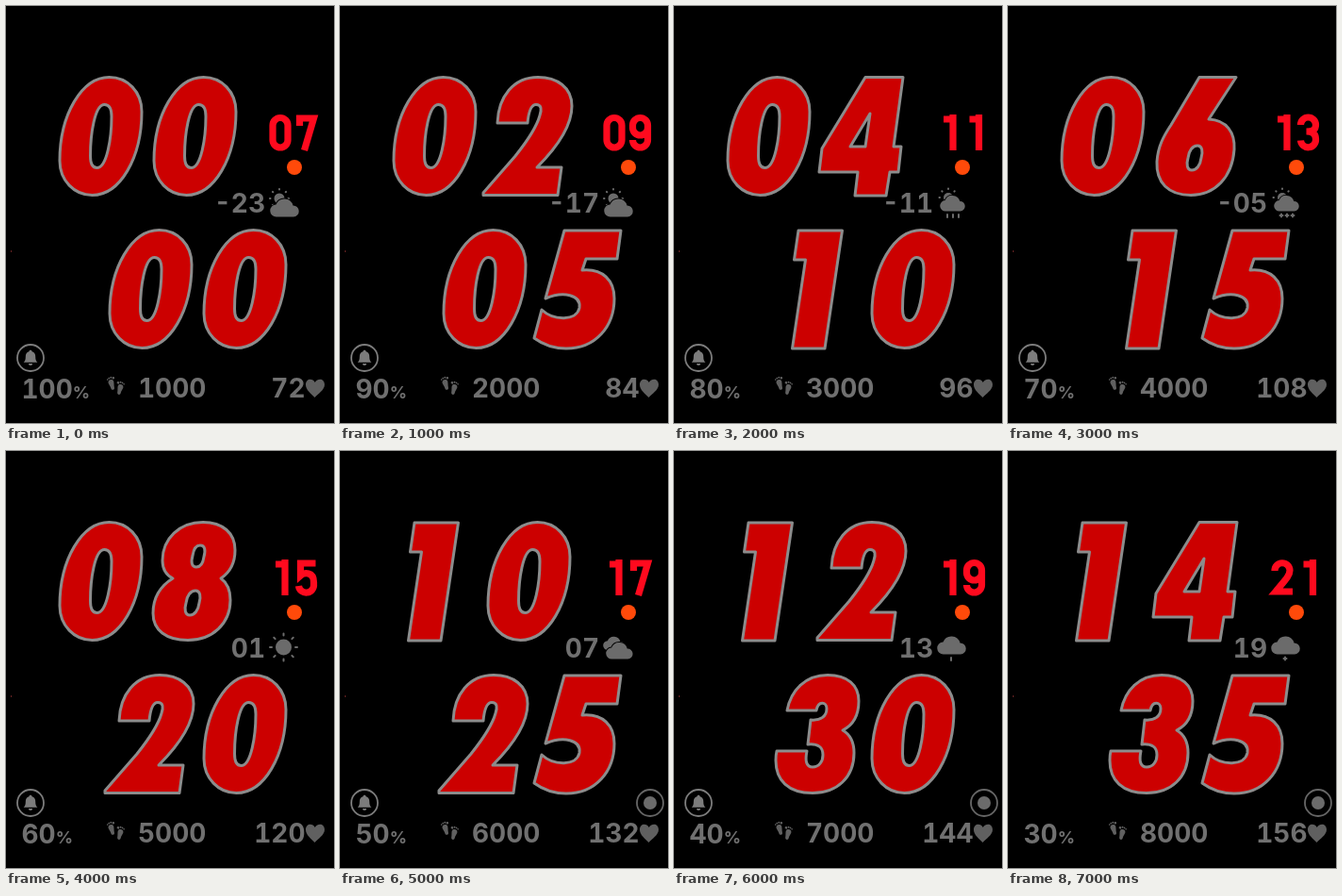
An HTML page that plays this animation: 348x442 px, repeating every 8 s.

```html
<!DOCTYPE html>
<html lang="en">
<head>
<meta charset="utf-8">
<title>Watch face</title>
<style>
  html, body { margin: 0; height: 100%; background: #000; overflow: hidden; }
  svg { display: block; }
  text { font: bold 28px Inter, Arial, sans-serif; font-variant-numeric: tabular-nums; fill: #707070; }
  .end { text-anchor: end; }
  .unit { font-size: 18px; }
  .big { fill: #c00; fill-rule: evenodd; stroke: #8c8c8c; stroke-width: 3; stroke-linejoin: round; }
  .day { fill: none; stroke: #ff0a1e; stroke-width: 7.2; }
  .ring { fill: none; stroke: #7c7c7c; stroke-width: 1.8; }
  .gray { fill: #6b6b6b; }
  .dim { fill: #606060; }
  .line { fill: none; stroke: #6b6b6b; stroke-width: 2; stroke-linecap: round; }
</style>
</head>
<body>
<svg width="348" height="442" viewBox="0 0 348 442">
  <rect width="348" height="442"/>
  <rect x="5" y="259" width="1" height="2" fill="#622"/>
  <g id="digits"></g>
  <circle cx="306" cy="171" r="8" fill="#ff4a0a"/>
  <g id="weather"></g>
  <text id="temp" class="end" x="275" y="218.5"></text>
  <text id="battery" x="16.5" y="416"></text>
  <text id="steps" x="140" y="415"></text>
  <text id="pulse" class="end" x="317.5" y="415"></text>

  <g id="bell">
    <circle class="ring" cx="26" cy="373" r="14"/>
    <path fill="#7c7c7c" transform="translate(3.400 48.500) scale(.87)" d="M26 363.500c1.200 0 1.800.8 1.800 1.800 3 1 4.200 3.300 4.200 6.200 0 4 .8 5 2.500 7H17.500c1.700-2 2.500-3 2.500-7 0-2.900 1.200-5.200 4.200-6.200 0-1 .6-1.800 1.800-1.800zM23.500 379.800h5a2.500 2.300 0 0 1-5 0z"/>
  </g>
  <g id="link">
    <circle class="ring" cx="329" cy="373" r="14" style="stroke:#666"/>
    <circle class="gray" cx="329" cy="373" r="7"/>
  </g>

  <defs>
    <g id="foot">
      <path d="M-3-2C-3-6 4-6 3.500-1C3 2 2 3 2 6C2 9-2 9-2 6C-2 3-3 1-3-2Z"/>
      <circle cx="-3.500" cy="-6" r="1.500"/><circle cx="-.8" cy="-7.300" r="1.100"/>
      <circle cx="1.500" cy="-7" r="1"/><circle cx="3.500" cy="-5.800" r=".9"/>
    </g>
  </defs>
  <g class="dim">
    <use href="#foot" transform="translate(112 400) rotate(-14) scale(-.9 .85)"/>
    <use href="#foot" transform="translate(121 405) rotate(12) scale(.9 .85)"/>
    <path d="M327.500 415C324 411 318 407 318 401.500C318 395 325 394 327.800 399C331 394 338 395 338 401.500C338 407 331 411 327.500 415Z"/>
  </g>
</svg>
<script>
const bigDigits = {
  0: "M53.500 1.500C73 1.500 88 17 88 38C88 87 65 126.500 35.500 126.500C16.500 126.500 1 111 1 90C1 41 24.500 1.500 53.500 1.500ZM48.500 30.500C53.500 30.500 56 35 56 43C56 66 51 97.500 40.500 97.500C35.500 97.500 33.500 93 33.500 85C33.500 62 38 30.500 48.500 30.500Z",
  1: "M23 2H69.500L51 127H16.500L30.500 33H18.500Z",
  2: "M-4 126.500H75L79 97H53C70 80 90 55 90 32C90 12 74 1.500 54 1.500C28 1.500 12 22 11 50H43C44 39 47 30.500 52 30.500C58 30.500 58 36 56 42C53 53 42 70 30 85L-4 124Z",
  3: "M11 39C15 18 30 1.500 54 1.500C75 1.500 87 12 87 29C87 45 80 55 70 60C77 64 82 72 82 84C82 110 64 126.500 38 126.500C12 126.500-1 113-1 92Q-1 86 0 82H32C30 92 31 99 38 99C45 99 49 93 49 86C49 78 44 74 33 75L36 49C47 50 53 45 53 37C53 30 44 28 42 39Z",
  4: "M47 1.500H87L77 75H85L82 102H73L69 127H36L39 102H-2L1 77ZM52 40L31 75H47Z",
  5: "M29 2H89L85 32H52L48 44C70 42 82 55 82 74C82 104 62 127 31 127Q12 127-3 116L5 86C18 98 42 98 45 84C47 70 28 66 9 74Z",
  6: "M47 1.500H86L57 46C76 47 85 60 84 78C82 108 63 126.500 38 126.500C14 126.500 1 113 2 91C3 75 9 64 17 52ZM45 74C50 74 51 80 49 87C48 95 44 100 39 100C34 100 33 94 35 87C36 79 40 74 45 74Z",
  8: "M53 1.500C74 1.500 87 13 87 31C87 45 81 55 72 61C79 66 82 74 82 84C82 109 63 126.500 37 126.500C14 126.500 0 116 0 98C0 81 8 69 21 61C13 57 10 50 10 42C10 19 28 1.500 53 1.500ZM50 26C55 26 56 31 54 38C53 45 50 49 46 49C41 49 40 44 42 37C43 30 46 26 50 26ZM45 74C50 74 51 80 49 87C48 95 44 100 39 100C34 100 33 94 35 87C36 79 40 74 45 74Z"
};
const dayDigits = {
  0: "M4 11.500A8 8 0 0 1 20 11.500V27A8 8 0 0 1 4 27Z",
  1: "M7 5H17M17 0V38",
  2: "M4 12A8 8 0 0 1 20 11.500C20 17 16 21 5 34H23",
  3: "M4 11A8 8 0 0 1 20 11C20 16 17 18 10 18C17 18 20 21 20 26A8 8 0 0 1 4 27.500",
  5: "M22 4H6V17C10 13.500 20 13 20 24V26A8 8 0 0 1 4 28",
  7: "M5 12V4H20L10 38",
  9: "M4 27A8 8 0 0 0 20 27V11.500A8 8 0 0 0 4 11.500V14A8 8 0 0 0 20 14"
};

const $ = id => document.getElementById(id);
const pad = n => (n < 0 ? "-" : "") + String(Math.abs(n)).padStart(2, "0");
const drawNumber = (n, shapes, style, x, y, pitch) => [...pad(n)].map((d, i) =>
  `<path class="${style}" transform="translate(${x + i * pitch} ${y})" d="${shapes[d]}"/>`).join("");

const cloud = (x, y, scale = 1) => `<path class="gray" stroke="#000" stroke-width="2" paint-order="stroke"
  transform="translate(${x} ${y}) scale(${scale})" d="M7 20a6.500 6.500 0 0 1-.5-13a9.500 9.500 0 0 1 18 1a6 6 0 0 1 .5 12z"/>`;
const line = d => `<path class="line" d="${d}"/>`;
const rays = (x, y, inner, outer) => line(Array.from({ length: 8 }, (_, i) => {
  const c = Math.cos(i * Math.PI / 4), s = Math.sin(i * Math.PI / 4);
  return `M${x + c * inner} ${y + s * inner}L${x + c * outer} ${y + s * outer}`;
}).join(""));
const sun = (x, y, r, ray) => `<circle class="gray" cx="${x}" cy="${y}" r="${r}"/>` + rays(x, y, r + 4, r + 4 + ray);
const star = (x, y) => line(`M${x - 1.5} ${y}h3M${x} ${y - 1.5}v3`);

const cloudySun = sun(290, 204, 5.5, .5) + cloud(280, 203.5);
const showerSun = sun(291, 203, 5, .5) + cloud(282, 200, .87);
const bigCloud = cloud(279, 195.5);
const weather = [
  cloudySun,
  cloudySun,
  showerSun + line("M290 221v3M296 221v3M302 221v3"),
  showerSun + star(290, 222) + star(296, 222) + star(302, 222),
  sun(294.5, 208, 8.5, 2),
  cloud(279, 196, .75) + cloud(282, 202, .93),
  bigCloud + line("M294 219v3"),
  bigCloud + star(294, 220)
];

function show(n) {
  $("digits").innerHTML =
    drawNumber(2 * n, bigDigits, "big", 56, 74, 100) +
    drawNumber(5 * n, bigDigits, "big", 109, 236, 100) +
    drawNumber(7 + 2 * n, dayDigits, "day", 279, 115, 27.5);
  $("weather").innerHTML = weather[n];
  $("temp").textContent = pad(6 * n - 23);
  $("battery").innerHTML = `${100 - 10 * n}<tspan class="unit">%</tspan>`;
  $("steps").textContent = 1000 * (n + 1);
  $("pulse").textContent = 72 + 12 * n;
  $("bell").style.display = n < 7 ? "" : "none";
  $("link").style.display = n < 5 ? "none" : "";
}

let shown = -1;
function tick() {
  const step = Math.floor(performance.now() / 1000) % 8;
  if (step !== shown) show(shown = step);
  requestAnimationFrame(tick);
}
tick();
</script>
</body>
</html>
```
